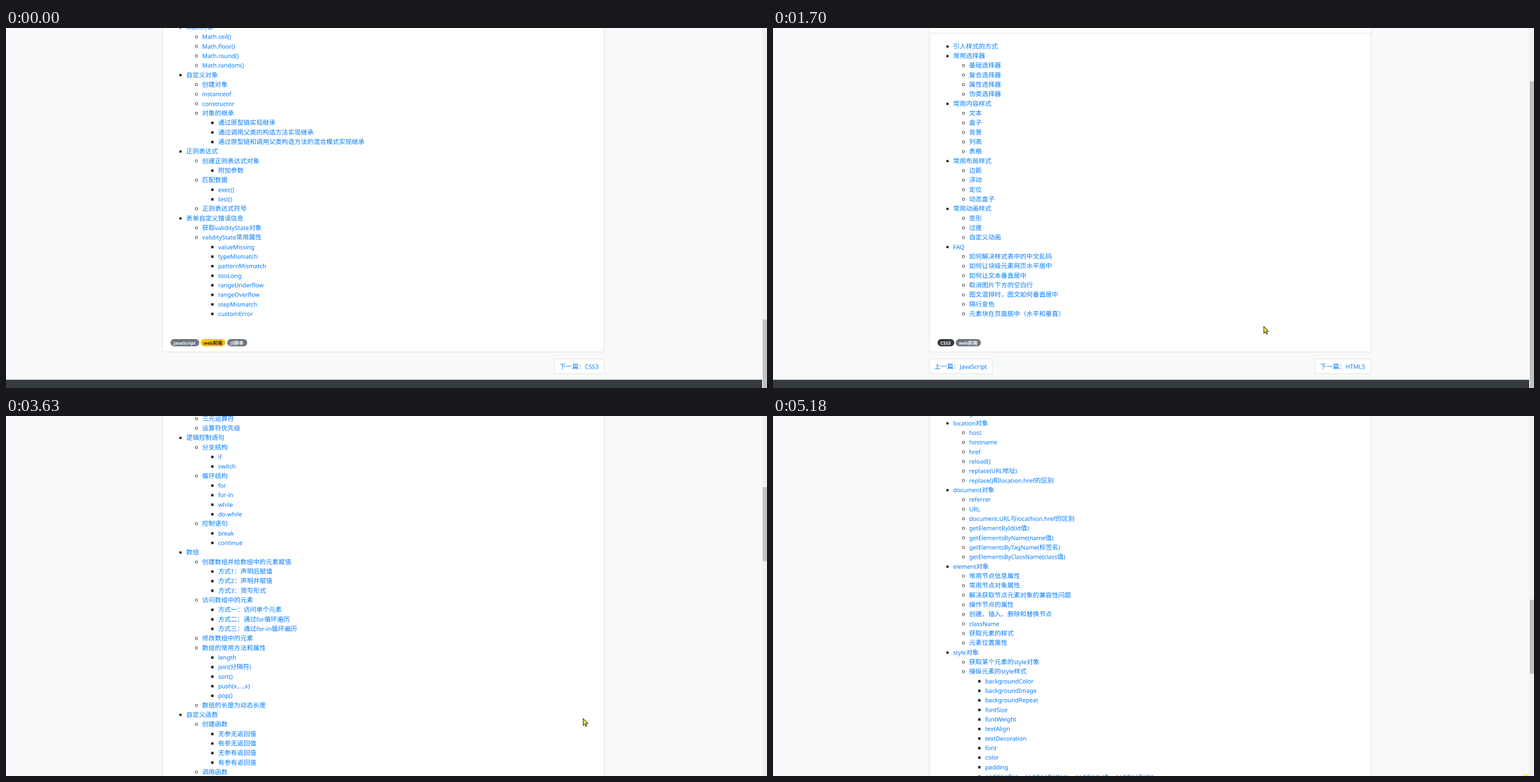
Animation of 1087 by 515 pixels, one loop 5270 ms. Source, as an HTML page with a canvas:

```html
<!DOCTYPE html>
<html lang="zh">
<head>
<meta charset="utf-8">
<title>CSS3 / JavaScript</title>
<style>
  html, body { margin: 0; width: 100%; height: 100%; overflow: hidden; background: #f8f9fa; }
  canvas { display: block; width: 1087px; height: 515px; }
</style>
</head>
<body>
<canvas id="stage"></canvas>
<script>
// Drawn at double size so that small text keeps its fractional positions.
const W = 1087, H = 515, LOOP = 5270, DETAIL = 2;
const canvas = document.getElementById('stage');
canvas.width = W * DETAIL;
canvas.height = H * DETAIL;
const ctx = canvas.getContext('2d');
ctx.scale(DETAIL, DETAIL);
ctx.textRendering = 'geometricPrecision';

const EM = 9.11, LATIN = 0.933, ROW = 13.6656, FIRST_ROW = 132, LAST_ROW = 408.6;
const VIEW = 552, TRACK = 532.5, TRACK_TOP = -9.5, HAIR = 0.75;
const LINK = '#007bff', INK = '#212529', GRAY = '#6c757d', DARK = '#343a40';

// "-" marks the second level of the outline, "=" the third.
const cssOutline = `引入样式的方式
常用选择器
-基础选择器
-复合选择器
-属性选择器
-伪类选择器
常用内容样式
-文本
-盒子
-背景
-列表
-表格
常用布局样式
-边距
-浮动
-定位
-动态盒子
常用动画样式
-变形
-过度
-自定义动画
FAQ
-如何解决样式表中的中文乱码
-如何让块级元素网页水平居中
-如何让文本垂直居中
-取消图片下方的空白行
-图文混排时，图文如何垂直居中
-隔行变色
-元素块在页面居中（水平和垂直）`;

const jsOutline = `引入JavaScript
-什么是JavaScript
-JavaScript的组成部分
-在HTML页面中引入JavaScript
=内部引入方式
=外部引入方式
=嵌入引入方式
-向HTML页面输出内容
-显示警告提示框
-JavaScript的运行原理
-注释
=单行注释
=多行注释
-指令结束符
变量的声明、赋值和使用
-变量名的命名规范
变量的数据类型
-查看某个变量或值的数据类型
-undefined与null的区别
-判断变量是否为数值(number)类型
数据类型转换
-变量的数据类型
-隐式类型转换
-强制类型转换
=任意类型转number
=任意类型转string
表达式与运算符
-什么是表达式
-运算符
=算术运算符
=赋值运算符
=比较运算符
=逻辑运算符
-三元运算符
-运算符优先级
逻辑控制语句
-分支结构
=if
=switch
-循环结构
=for
=for-in
=while
=do-while
-控制语句
=break
=continue
数组
-创建数组并给数组中的元素赋值
=方式1：声明后赋值
=方式2：声明并赋值
=方式3：简写形式
-访问数组中的元素
=方式一：访问单个元素
=方式二：通过for循环遍历
=方式三：通过for-in循环遍历
-修改数组中的元素
-数组的常用方法和属性
=length
=join(分隔符)
=sort()
=push(x,...,x)
=pop()
-数组的长度为动态长度
自定义函数
-创建函数
=无参无返回值
=有参无返回值
=无参有返回值
=有参有返回值
-调用函数
=直接调用
=通过事件调用
-匿名函数
-变量的作用域
=全局变量
=局部变量
事件
-鼠标事件
-键盘事件
-表单事件
浏览器对象模型
-BOM的结构
window对象
-prompt(提示,默认值)
-alert(信息)
-confirm(信息)
-close()
-open(URL,窗口名,窗口特征，是否替换浏览历史中的当前条目)
-setTimeout(方法名,毫秒数,参数)
-setInterval(方法名,毫秒数,参数),clearInterval()
history对象
-back()
-forward()
-go(n)
location对象
-host
-hostname
-href
-reload()
-replace(URL地址)
-replace()和location.href的区别
document对象
-referrer
-URL
-document.URL与locathion.href的区别
-getElementById(id值)
-getElementsByName(name值)
-getElementsByTagName(标签名)
-getElementsByClassName(class值)
element对象
-常用节点信息属性
-常用节点对象属性
-解决获取节点元素对象的兼容性问题
-操作节点的属性
-创建、插入、删除和替换节点
-className
-获取元素的样式
-元素位置属性
style对象
-获取某个元素的style对象
-操纵元素的style样式
=backgroundColor
=backgroundImage
=backgroundRepeat
=fontSize
=fontWeight
=textAlign
=textDecoration
=font
=color
=padding
=paddingTop、paddingBottom、paddingLeft、paddingRight
${'\n'.repeat(20)}Math对象
-Math.ceil()
-Math.floor()
-Math.round()
-Math.random()
自定义对象
-创建对象
-instanceof
-constructor
-对象的继承
=通过原型链实现继承
=通过调用父类的构造方法实现继承
=通过原型链和调用父类构造方法的混合模式实现继承
正则表达式
-创建正则表达式对象
=附加参数
-匹配数据
=exec()
=test()
-正则表达式符号
表单自定义错误信息
-获取validityState对象
-validityState常用属性
=valueMissing
=typeMismatch
=patternMismatch
=tooLong
=rangeUnderflow
=rangeOverflow
=stepMismatch
=customError`;

function makePage(title, date, hits, outline, badges, buttons) {
  const items = outline.split('\n').map(line => {
    const level = '-='.indexOf(line[0] || ' ') + 1;
    return { level, label: level ? line.slice(1) : line };
  });
  const end = FIRST_ROW + (items.length - 1) * ROW;
  return { title, date, hits, items, badges, buttons, end, maxScroll: end - LAST_ROW };
}

const jsPage = makePage('JavaScript', '2020/8/7 下午6:13:58', ['点击：100', 351], jsOutline,
  [['JavaScript', 235, 41, GRAY, '#fff'], ['web前端', 278, 35.5, '#ffc107', INK], ['JS脚本', 316, 28.5, GRAY, '#fff']],
  [['下一篇：CSS3', 783.5, 71]]);
const cssPage = makePage('CSS3', '2020/2/24 下午6:29:40', ['点击：123', 355], cssOutline,
  [['CSS3', 235, 24, DARK, '#fff'], ['web前端', 261, 36, GRAY, '#fff']],
  [['上一篇：JavaScript', 223.4, 90.2], ['下一篇：HTML5', 774.5, 80]]);

const STEP_TIMES = [130, 670, 1230, 1780, 2300, 2840, 3400, 3960, 4490, 5025];
const CSS_OPENS = 10, JS_OPENS = 35;
const scrollKeys = [[13, 0], [15, 15], [17, 46], [20, 106], [34, 106]];
const longScrollKeys = [[39, 0], [41, 130], [45, 579.5], [50, 1258.7], [53, 1350], [57, 1395], [61, 1420.2]];
const pointerKeys = [
  [0, 930, 506], [1, 905, 499], [4, 826, 482], [7, 822, 481], [9, 815, 478], [16, 701, 427], [20, 701, 427],
  [26, 278, 468], [27, 278, 468], [28, 280, 479], [29, 282, 480], [32, 286, 481], [34, 362, 494],
  [39, 701, 392], [41, 701, 392], [45, 824.5, 433], [49, 960, 520]];

function stepAt(t) {
  if (t < STEP_TIMES[0]) return -1;
  let i = 0;
  while (i < STEP_TIMES.length - 2 && t >= STEP_TIMES[i + 1]) i++;
  const part = (t - STEP_TIMES[i]) / (STEP_TIMES[i + 1] - STEP_TIMES[i]);
  return Math.min(61, Math.floor((i + part) * 7 + 0.2));
}

function sample(keys, k) {
  if (k <= keys[0][0]) return keys[0].slice(1);
  for (let i = 1; i < keys.length; i++) {
    const a = keys[i - 1], b = keys[i];
    if (k <= b[0]) {
      const u = (k - a[0]) / (b[0] - a[0]);
      return a.slice(1).map((v, j) => v + (b[j + 1] - v) * u);
    }
  }
  return keys[keys.length - 1].slice(1);
}

// Draws mixed Latin and Chinese text centred on y.
function text(str, x, y, color, size = EM, weight = 400) {
  ctx.fillStyle = color;
  for (const run of str.match(/[ -~]+|[^ -~]+/g) || []) {
    ctx.font = /[ -~]/.test(run[0])
      ? `${weight} ${size * LATIN}px "Noto Sans", "Open Sans", sans-serif`
      : `${weight} ${size}px "Noto Sans CJK SC", "Noto Sans CJK", sans-serif`;
    ctx.fillText(run, x, y + size * 0.37);
    x += ctx.measureText(run).width;
  }
}

function rect(x, y, w, h, color) {
  ctx.fillStyle = color;
  ctx.fillRect(x, y, w, h);
}

function box(x, y, w, h, r, fill, stroke, line = HAIR) {
  ctx.beginPath();
  ctx.roundRect(x, y, w, h, r);
  if (fill) { ctx.fillStyle = fill; ctx.fill(); }
  if (stroke) { ctx.strokeStyle = stroke; ctx.lineWidth = line; ctx.stroke(); }
}

function disc(x, y, r, color) {
  ctx.beginPath();
  ctx.arc(x, y, r, 0, Math.PI * 2);
  ctx.fillStyle = color;
  ctx.fill();
}

function drawNav(top) {
  const y = top - 1, pale = '#9a9da0';
  rect(0, top - 19, 1080, 34, DARK);
  disc(15, y, 6, '#f5a623');
  [['首页', 37], ['WEB前端', 64], ['PHP', 110], ['NodeJS', 135], ['Java', 175], ['登录', 1004], ['guest', 1031]]
    .forEach(([label, x]) => text(label, x, y, pale));
  box(224.5, top - 13, 113, 22, 2, '#fff', '#ced4da');
  text('请输入关键词...', 231, y, GRAY);
  box(342.5, top - 13, 33, 22, 2, null, '#28a745');
  text('搜索', 350, y, '#28a745');
}

function drawBullet(level, x, y) {
  const r = 1.75;
  if (level === 0) disc(x, y, r, INK);
  else if (level === 2) rect(x - r, y - r, r * 2, r * 2, INK);
  else {
    ctx.beginPath();
    ctx.arc(x, y, r, 0, Math.PI * 2);
    ctx.strokeStyle = INK;
    ctx.lineWidth = 0.6;
    ctx.stroke();
  }
}

function drawButton([label, x, w], y, hovered, focused) {
  if (focused) box(x - 1.2, y - 1.2, w + 2.4, 23.4, 3, null, 'rgba(0,123,255,.25)', 1.8);
  box(x, y, w, 21, 2, hovered ? '#e9ecef' : '#fff', '#dee2e6');
  text(label, x + 7, y + 10.7, hovered ? '#0056b3' : LINK);
}

function drawPage(page, scroll, pointer, focusIndex) {
  const top = -scroll, end = page.end + top;
  rect(0, 0, W, H, '#f8f9fa');
  drawNav(top);

  rect(223, top + 28, 632, 28, '#fff');
  text('首页', 232, top + 42, LINK);
  text('/', 255, top + 42, GRAY);
  text('WEB前端', 265, top + 42, LINK);
  text('/', 306, top + 42, GRAY);
  text(page.title, 314, top + 42, GRAY);

  const cardTop = top + 65.5, cardEnd = end + 54.8;
  box(223.4, cardTop, 631.1, cardEnd - cardTop, 2, '#fff', '#dfdfdf');
  rect(223.7, top + 113.1, 630.5, HAIR, '#dfdfdf');
  text(page.title, 234.7, top + 82, INK, 15.94, 600);
  text('发表时间：' + page.date, 234.7, top + 101, GRAY, 7.29);
  text(page.hits[0], page.hits[1], top + 101, GRAY, 7.29);

  page.items.forEach(({ level, label }, i) => {
    const x = 257.4 + level * 22.78, y = FIRST_ROW + i * ROW + top;
    if (!label || y < -10 || y > H + 10) return;
    drawBullet(level, x - 8.2, y + 0.45);
    text(label, x, y, LINK);
  });

  for (const [label, x, w, fill, color] of page.badges) {
    box(x, end + 36.4, w, 10.4, 5.2, fill);
    text(label, x + 4.1, end + 41.8, color, 6.83, 700);
  }

  const buttonY = end + 64.8;
  let overLink = false;
  page.buttons.forEach((button, i) => {
    const [, x, w] = button;
    const hovered = !!pointer && pointer[0] > x && pointer[0] < x + w && pointer[1] > buttonY && pointer[1] < buttonY + 21;
    overLink = overLink || hovered;
    drawButton(button, buttonY, hovered, i === focusIndex);
  });
  rect(0, end + 94.6, 1080, H, DARK);

  const ratio = TRACK / (page.maxScroll + VIEW);
  rect(1080, 0, 7, H, '#f1f1f1');
  rect(1081, TRACK_TOP + scroll * ratio, 6, VIEW * ratio, '#c1c1c1');
  return overLink;
}

function drawPointer([x, y], hand) {
  const path = new Path2D(hand
    ? 'M-1 1Q0-.6 1 1V4.5L4 5.2Q5.3 5.6 5 7.2L4 10V12H-1V10.5L-3.2 7.2Q-3.4 5.8-2 6.3L-1 7.3Z'
    : 'M0 0V9.6L2.2 7.6 3.8 11 5.2 10.3 3.7 7H6.6Z');
  ctx.save();
  ctx.translate(x, y);
  ctx.fillStyle = hand ? '#ffee00' : '#f8f03c';
  ctx.strokeStyle = '#222';
  ctx.lineWidth = 0.8;
  ctx.fill(path);
  ctx.stroke(path);
  ctx.restore();
}

function render(t) {
  const k = stepAt(t);
  const pointer = k >= 0 && k < 49 ? sample(pointerKeys, k) : null;
  const onCss = k >= CSS_OPENS && k < JS_OPENS;
  const page = onCss ? cssPage : jsPage;
  const scroll = onCss ? sample(scrollKeys, k)[0]
    : k < CSS_OPENS ? page.maxScroll : sample(longScrollKeys, k)[0];
  const focused = (k >= 7 && k < CSS_OPENS) || (k >= 31 && k < JS_OPENS) ? 0 : -1;

  const overLink = drawPage(page, scroll, pointer, focused);
  if (pointer) drawPointer(pointer, overLink);
  if (t >= 5180) disc(1075.5, 518.5, 6.5, '#fff06a');
}

function tick() {
  render(performance.now() % LOOP);
  requestAnimationFrame(tick);
}
tick();
</script>
</body>
</html>
```
